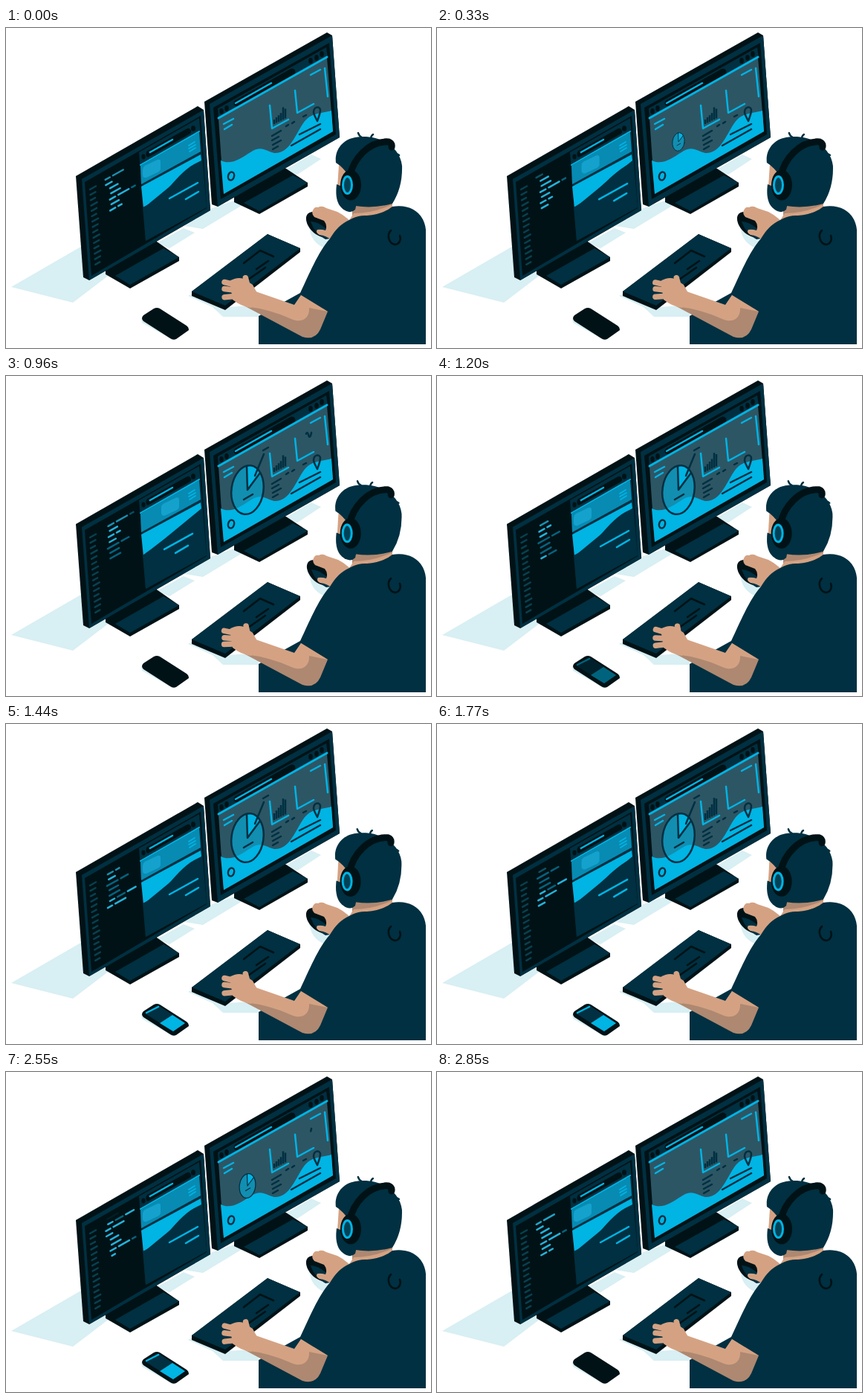
Recreate the animation shown at these times as an HTML page. Size 572 by 430 pixels, loop 2880 ms.

```html
<!DOCTYPE html>
<html lang="en">
<head>
<meta charset="utf-8">
<title>Developer at two screens</title>
<style>
html, body { margin: 0; width: 100%; height: 100%; overflow: hidden; background: #fff; }
svg { display: block; width: 572px; height: 430px; }
.navy { fill: #003041; }
.ink { fill: #011216; }
.cyan { fill: #00b4e4; }
.blue { fill: #078bb3; }
.shade { fill: #d8eff3; }
.skin { fill: #d4a283; }
.tan { fill: #ae8871; }
.l { fill: none; stroke-linecap: round; stroke-linejoin: round; stroke-width: 2.5; }
.sn { stroke: #003041; }
.si { stroke: #011216; }
.sc { stroke: #00b4e4; }
.ss { stroke: #d4a283; }
</style>
</head>
<body>
<svg viewBox="0 0 572 430">
<defs>
  <clipPath id="heroClip"><path d="M181 185L260 140L262 166L182 210Z"/></clipPath>
</defs>

<g class="shade">
  <path d="M7 348L104 292L140 331L90 369Z"/>
  <path d="M203 289L239 269L254 275L220 296Z"/>
  <path d="M240 266L275 243L310 231L318 238L265 270Z"/>
  <path d="M372 193L411 170L424 176L392 197Z"/>
  <path d="M245 360L254 355L300 375L340 372V388H292L278 375Z"/>
  <path d="M182 391L186 388L228 415L224 419L183 396Z"/>
  <path d="M405 254L418 262L440 284L432 297Q412 290 409 272Z"/>
</g>

<!-- left monitor -->
<path class="ink" d="M134 322L200 285L233 308V313L167 350L134 331Z"/>
<path class="navy" d="M147 333L212 296L233 308L167 345Z"/>
<path class="ink" d="M94 199L258 105L266 110L275 245L112 339L104 335Z"/>
<path class="navy" d="M102 203L266 110L275 245L112 339Z"/>
<path class="ink" d="M106 207L262 118L270 242L115 333Z"/>
<g id="gutter" class="l" stroke="#08404f"></g>
<g id="code" class="l"></g>
<path class="navy" d="M179 167L260 121L270 241L188 286Z"/>
<path class="l si" style="stroke-width:8" d="M193 168L245 139"/>
<path class="l sc" d="M192 168L224 150"/>
<g class="ink">
  <ellipse cx="185" cy="173" rx="2.6" ry="3.4"/><ellipse cx="191" cy="170" rx="2.6" ry="3.4"/>
  <ellipse cx="252" cy="135" rx="3" ry="3.8"/>
</g>
<path class="blue" d="M181 185L260 140L262 166L182 210Z"/>
<path class="l sc" style="stroke-width:2" d="M181 184L260 139"/>
<g clip-path="url(#heroClip)">
  <path id="card" fill="#14a2cd" d="M187 185L204 177Q208 176 208 180V189Q208 192 204 194L189 201Q185 202 184 198V190Q184 187 187 185Z"/>
</g>
<path class="l sc" style="stroke-width:1.7" d="M246 158L254 153M246 162L255 157M247 166L255 161"/>
<path class="cyan" d="M182 213L262 170L263 178L185 242Z"/>
<path id="hill" class="navy"/>
<path id="textA" class="l sc" d="M220 229L258 208"/>
<path id="textB" class="l sc" d="M242 230L259 220"/>

<!-- right monitor -->
<path class="ink" d="M307 225L374 187L406 208V213L341 250L307 234Z"/>
<path class="navy" d="M320 235L386 198L406 208L341 246Z"/>
<path class="ink" d="M267 99L432 6L439 10L449 147L285 240L277 237Z"/>
<path class="navy" d="M274 102L439 10L449 147L285 240Z"/>
<path class="ink" d="M279 107L435 20L444 143L289 230Z"/>
<path class="navy" d="M285 108L431 26L433 40L286 122Z"/>
<path class="l si" style="stroke-width:9" d="M311 101L385 59"/>
<path class="l sc" d="M309 101L357 74"/>
<g class="ink">
  <ellipse cx="290" cy="112" rx="2.7" ry="4"/><ellipse cx="297" cy="108" rx="2.7" ry="4"/>
  <ellipse cx="410" cy="44" rx="2.8" ry="4"/><ellipse cx="418" cy="40" rx="2.8" ry="4"/><ellipse cx="425" cy="35" rx="2.8" ry="4"/>
</g>
<path fill="#2d5665" d="M286 122L432 40L440 139L293 223Z"/>
<path class="cyan" d="M289 178C303 185 316 175 329 167C344 157 350 166 361 168C381 169 388 146 400 128C410 113 425 115 438 111L440 139L293 223Z"/>
<path class="l sc" style="stroke-width:3" d="M286 121L432 39"/>
<path class="l sc" d="M293 129L306 122M294 136L304 130M410 63L423 56M429 54L433 92"/>
<path class="l sc" d="M355 104L358 135L380 123M389 84L392 114L414 102"/>
<path id="bars" class="l sn" style="stroke-linecap:butt"/>
<path class="l sn" d="M358 145L370 138M358 151L367 146M359 157L370 151M359 163L366 159M377 132L380 130M385 128L388 126M400 119L404 117"/>
<path class="l sn" d="M395 143L423 129M384 158L423 136"/>
<ellipse class="l sn" cx="303" cy="199" rx="4" ry="5.6" transform="rotate(15 303 199)"/>
<path class="l sn" d="M419 125C416 119 414 116 414 113C414 106 422 104 423 110C423 115 421 119 419 125Z"/>
<g id="pie">
  <ellipse class="cyan" opacity=".6" cx="325" cy="153" rx="21.5" ry="33" transform="rotate(8 325 153)"/>
  <path class="cyan" d="M325 153L324 121Q335 118 342 130Z"/>
  <g class="l sn">
    <ellipse cx="325" cy="153" rx="21.5" ry="33" transform="rotate(8 325 153)"/>
    <path d="M324 121L325 153L342 130M320 166L332 159"/>
  </g>
</g>
<path id="pointer" class="l sn" d="M335 134L347 105" pathLength="1"/>
<path id="callout" class="l sn" d="M346 100L353 96" pathLength="1"/>
<path id="spark" class="l sn" pathLength="1" d="M397 100C398 105 402 106 403 98L403 84C403 76 406 74 407 79C408 84 410 82 411 76"/>

<!-- keyboard -->
<path class="ink" d="M250 354L352 277L396 296V301L295 379L250 360Z"/>
<path class="navy" d="M250 354L352 277L396 296L295 373Z"/>
<path class="l si" d="M320 316L342 299L360 307M353 313L337 324M349 322L326 338"/>

<!-- phone -->
<path class="ink" d="M185 386L199 377Q203 375 207 377L243 400Q246 402 246 406L229 418Q225 420 221 417L185 394Q181 390 185 386Z"/>
<g id="phone">
  <path class="navy" d="M187 389L205 378L241 402L225 413Z"/>
  <path class="cyan" d="M207 402L224 391L241 402L225 413Z"/>
  <path class="l sc" d="M189 388L205 380"/>
</g>

<!-- mouse hand -->
<g id="mouse">
  <ellipse class="ink" cx="420" cy="264" rx="20" ry="12" transform="rotate(48 420 264)"/>
  <path class="navy" d="M410 260Q420 260 431 270L436 283L430 284Q415 276 410 260Z"/>
  <path class="skin" d="M414 243Q416 240 420 241Q425 238 431 242L446 247Q456 252 466 262L438 285Q431 279 422 278Q416 275 419 271Q424 270 430 272Q433 265 428 259L415 254Q410 249 414 243Z"/>
</g>

<!-- person -->
<path class="tan" d="M466 232H520V249L500 259L466 254Z"/>
<path class="skin" d="M468 249Q495 249 520 237V252L492 260L462 258Z"/>
<path class="navy" d="M462 258Q474 251 486 252Q508 250 520 240C546 236 563 250 565 271V425H340V387L396 356C408 331 420 301 436 283C444 270 451 263 462 258Z"/>
<path class="l si" d="M518 272C512 278 515 290 524 291C530 290 532 284 530 279"/>
<g id="head">
  <path class="skin" d="M447 184L445 214L460 224L463 190Z"/>
  <path class="navy" d="M444 210C442 226 444 240 457 246Q464 249 469 244L474 222Z"/>
  <path class="navy" d="M443 181C441 165 451 150 469 147C499 142 529 158 532 185Q533 214 519 236Q494 243 469 239L462 201Q453 187 443 181Z"/>
  <path class="l sn" d="M473 141Q474 145 478 147M490 149Q490 145 493 143M521 170Q525 168 528 171"/>
  <path class="l si" style="stroke-width:9" d="M462 199C466 176 488 151 514 153Q519 155 518 160"/>
  <ellipse class="ink" cx="463" cy="211" rx="14" ry="20.5"/>
  <ellipse cx="458.5" cy="211" rx="6" ry="11.5" fill="#024256" stroke="#00b4e4" stroke-width="3"/>
</g>

<!-- typing arm -->
<path class="tan" d="M322 374L336 355L388 373L397 359L433 381L423 405Q416 420 399 415Z"/>
<path class="skin" d="M322 374L336 354L388 372L397 359L433 381L408 376C409 391 397 397 384 391Q356 378 322 374Z"/>
<g id="fingers" class="l ss" style="stroke-width:7.5"></g>
<path class="skin" d="M301 340Q311 334 320 337L332 345L338 356L330 376Q316 374 305 365Z"/>
</svg>

<script>
const LOOP = 2880, HALF = LOOP / 2, SLOPE = -0.56;
const $ = id => document.getElementById(id);
const mix = (a, b, p) => a + (b - a) * p;
const clamp = p => Math.max(0, Math.min(1, p));

function ease(t, from, to) {
  const p = clamp((t - from) / (to - from));
  return p * p * (3 - 2 * p);
}

// Rises from a to b, stays, falls from c to d
const pulse = (t, a, b, c, d) => ease(t, a, b) - ease(t, c, d);

function seeded(seed) {
  return () => (seed = seed * 16807 % 2147483647) / 2147483647;
}

function add(parent) {
  const el = document.createElementNS("http://www.w3.org/2000/svg", "path");
  $(parent).append(el);
  return el;
}

function trim(id, from, to) {
  const el = $(id), len = Math.max(0, to - from);
  el.style.visibility = len > 0.01 ? "visible" : "hidden";
  el.style.strokeDasharray = `${len} 3`;
  el.style.strokeDashoffset = -from;
}

const slide = (id, dx, slope = SLOPE) =>
  $(id).setAttribute("transform", `translate(${dx} ${dx * slope})`);

const dash = (x, y, a, b) => `M${x + a} ${y + a * SLOPE}L${x + b} ${y + b * SLOPE}`;

for (let i = 0; i < 15; i++) {
  add("gutter").setAttribute("d", dash(113 + i * 0.52, 217 + i * 7.2, 0, 8 - i % 3));
}

// Each code row is a few dashes with gaps, laid out along the slope
const ROWS = 12, STEP = LOOP / ROWS;
const rand = seeded(77);
const dashes = [];
for (let row = 0; row < ROWS; row++) {
  const limit = mix(16, 39, rand());
  for (let a = 7 * rand(), b; a < limit - 3; a = b + 4) {
    b = Math.min(limit, a + mix(6, 18, rand()));
    const el = add("code");
    el.setAttribute("stroke", rand() < 0.25 ? "#06627e" : "#25b2da");
    dashes.push({ row, a, b, el });
  }
}

function drawCode(t) {
  for (const { row, a, b, el } of dashes) {
    const age = (t + 150 + (ROWS + 5 - row) * STEP) % LOOP / STEP;
    const v = 6.4 - age, end = Math.min(b, age * 42);
    el.style.opacity = end > a ? clamp(v + 1) : 0;
    el.setAttribute("d", dash(133 + v * 0.55, 206 + v * 7.2, a, end));
  }
}

function drawBars(t) {
  const grow = pulse(t, 960, 1440, 2070, 2550);
  const rise = pulse(t, 1440, 2070, 2070, 2550) + ease(t, 1440, 2070) * 0;
  let d = "";
  for (let i = 0; i < 6; i++) {
    const h = 6 + 1.4 * i + (i == 4 ? 5 : 0) + grow * (3 + i * 0.8) + rise * i * 0.5;
    d += `M${361 + i * 3} ${129 - i * 1.5}v${-h}`;
  }
  $("bars").setAttribute("d", d);
}

function drawLeft(h) {
  const move = pulse(h, 150, 550, 960, 1110);
  slide("card", 25 * move, -0.54);
  const drift = -7 * pulse(h, 0, 960, 960, 1110);
  slide("textA", drift);
  slide("textB", drift * 2);
  let d = "M188 286";
  for (let i = 0; i <= 16; i++) {
    const p = i / 16;
    const bump = 4 * (1 - move) * Math.sin(2 * Math.PI * p);
    d += `L${mix(184, 263, p)} ${mix(241, 178 + 4 * move, p) + bump}`;
  }
  $("hill").setAttribute("d", d + "L270 241Z");
}

function drawRight(t, h) {
  const size = pulse(t, 180, 540, 2400, 2700);
  $("pie").setAttribute("transform", `translate(325 153) scale(${size}) translate(-325 -153)`);
  $("pie").style.visibility = size > 0.01 ? "visible" : "hidden";
  trim("pointer", 0, pulse(t, 420, 660, 2070, 2300));
  trim("callout", 0, pulse(t, 630, 840, 1750, 2000));
  trim("spark", ease(h, 520, 1230), mix(0, 1, ease(h, 350, 900)));
  $("phone").style.opacity = pulse(t, 1110, 1290, 2610, 2760);
}

const fingers = [0, 1, 2, 3].map(() => add("fingers"));

function drawPerson(t) {
  const phase = 2 * Math.PI * t / LOOP;
  $("head").setAttribute("transform", `translate(1 0) rotate(${-0.35 * (1 - Math.cos(phase))} 494 245)`);
  slide("mouse", 4 * pulse(t, 330, 660, 660, 1100), 0.1);
  fingers.forEach((el, i) => {
    const turn = 2.4 * Math.sin(phase * 8 + i * 1.7);
    const y = 346 + 7 * i;
    el.setAttribute("d", i < 3 ? `M312 ${y}L294 ${341.5 + 10 * i}` : "M326 350L323 336");
    el.setAttribute("transform", `rotate(${turn} 316 352)`);
  });
}

function frame() {
  const t = Math.floor(performance.now() / 30) * 30 % LOOP, h = t % HALF;
  drawCode(t);
  drawBars(t);
  drawLeft(h);
  drawRight(t, h);
  drawPerson(t);
  requestAnimationFrame(frame);
}
frame();
</script>
</body>
</html>
```
